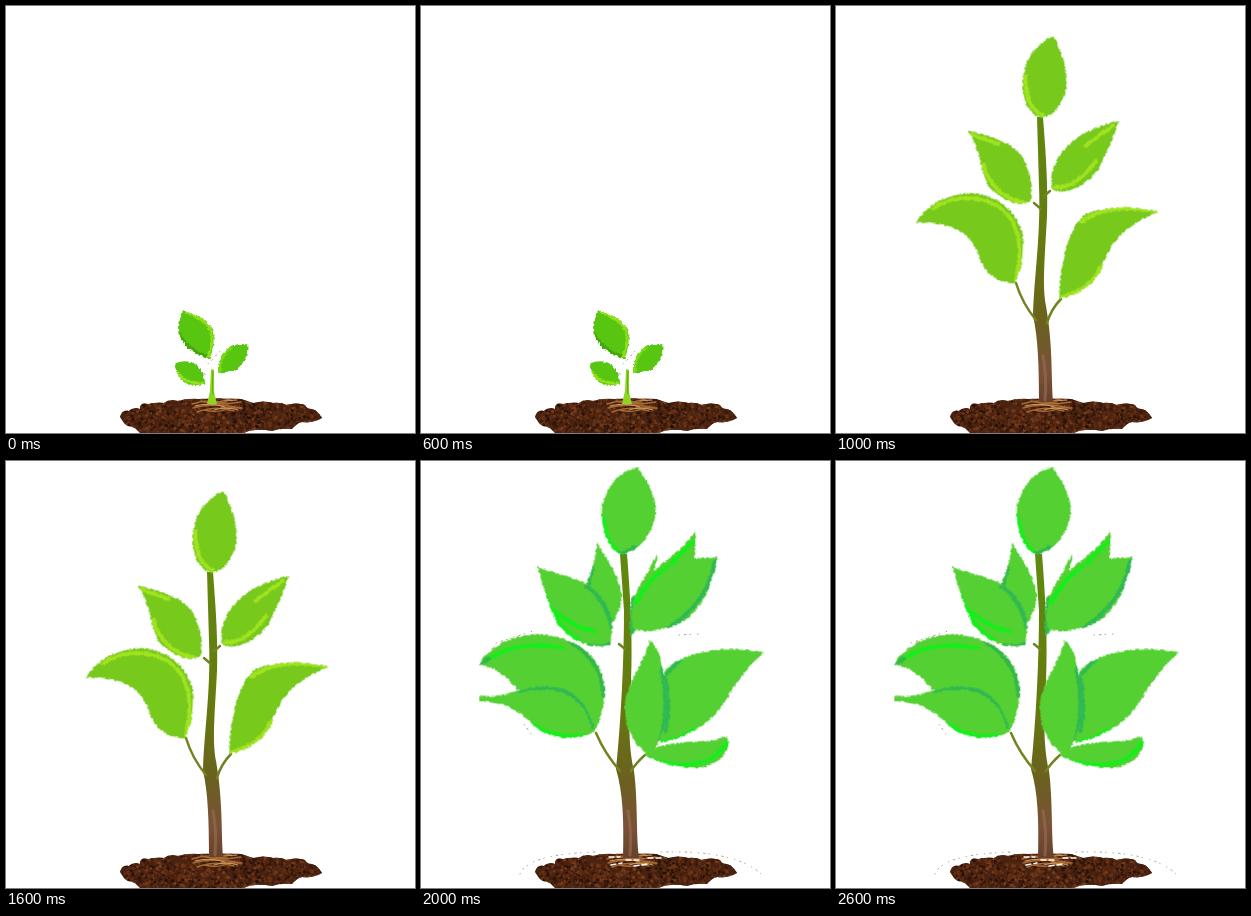
Recreate the animation shown at these times as an HTML page. Size 409x427 px, loop 3 s.

```html
<!DOCTYPE html>
<html lang="en">
<head>
<meta charset="utf-8">
<title>Growing plant</title>
<style>
  html, body { margin: 0; width: 100%; height: 100%; overflow: hidden; background: #fff; }
  svg { display: block; width: 100%; height: 100%; }
  .stage { visibility: hidden; }
  path { stroke-linecap: round; stroke-linejoin: round; }
</style>
</head>
<body>
<svg id="scene" viewBox="0 0 409 427">
  <defs>
    <filter id="rough" x="0" y="0" width="409" height="430" filterUnits="userSpaceOnUse" color-interpolation-filters="sRGB">
      <feTurbulence baseFrequency=".2" numOctaves="2" seed="4"/>
      <feDisplacementMap in="SourceGraphic" scale="1.8" xChannelSelector="R" yChannelSelector="G"/>
    </filter>
    <linearGradient id="bark" gradientUnits="userSpaceOnUse" x1="0" y1="95" x2="0" y2="397">
      <stop offset="0" stop-color="#5f8a0c"/>
      <stop offset=".5" stop-color="#66790f"/>
      <stop offset=".74" stop-color="#6b601f"/>
      <stop offset=".9" stop-color="#7a5138"/>
      <stop offset="1" stop-color="#65412a"/>
    </linearGradient>
    <clipPath id="soilShape">
      <path d="M114 411Q116 403 123 405Q128 400 134 403Q134 396 142 398Q151 396 158 397Q164 392 172 395Q182 392 192 393Q215 392 235 393Q241 395 247 397Q257 394 267 397Q275 396 280 399Q291 396 299 399Q301 403 306 403Q312 405 316 412Q309 417 296 416Q291 417 286 423Q274 422 266 425Q257 423 249 424Q243 424 238 427H134Q130 421 122 420Q118 418 114 411Z"/>
    </clipPath>
  </defs>
  <rect width="409" height="427" fill="#fff"/>
  <g id="soil" clip-path="url(#soilShape)"><rect x="110" y="388" width="210" height="40" fill="#4a2210"/></g>
  <path d="M186 398Q203 392 223 398M187 402Q207 396 233 402M191 406Q210 399 228 405M195 395Q214 400 235 396M198 404Q214 408 229 400M200 400Q215 395 225 393M215 402H236" fill="none" stroke="#a66a35" stroke-width="1.4"/>
  <path d="M189 400Q203 396 219 401M208 404Q219 400 232 404M219 395L231 394" fill="none" stroke="#cf9c64"/>
</svg>
<script>
const scene = document.getElementById('scene');

function add(parent, tag, attrs) {
  const node = document.createElementNS('http://www.w3.org/2000/svg', tag);
  for (const key in attrs) node.setAttribute(key, attrs[key]);
  return parent.appendChild(node);
}

const line = (parent, d, stroke, width, extra) =>
  add(parent, 'path', { d, stroke, fill: 'none', 'stroke-width': width, ...extra });

let seed = 7;
const random = () => (seed = seed * 16807 % 2147483647) / 2147483647;

const soil = document.getElementById('soil');
const earth = ['#220e06', '#35180b', '#4a2210', '#5a2b14', '#6b3518', '#7d421f'];
for (let i = 0; i < 1500; i++) {
  add(soil, 'circle', {
    cx: 113 + random() * 204, cy: 391 + random() * 36, r: .7 + random() * 1.2,
    fill: earth[Math.floor(random() * earth.length)], opacity: .8
  });
}

// Each leaf: outline, then pairs of edge colour and edge path.
const stages = [
  {
    fill: '#58c610',
    leaves: [
      ['M178 305C194 309 206 318 208 328C209 338 207 347 204 353C190 349 174 340 173 325C172 316 175 309 178 305Z',
        '#8fdf16', 'M181 307C197 312 206 321 206 331Q206 342 203 350', '#43a60c', 'M174 328Q180 343 200 350'],
      ['M242 339C243 350 239 358 231 364Q222 367 213 367C211 354 218 344 227 340Q234 338 242 339Z',
        '#7bd818', 'M214 365Q214 349 225 342'],
      ['M169 358C177 355 186 355 192 360Q198 367 199 378Q188 382 178 376Q171 370 169 358Z',
        '#93e01d', 'M172 367Q179 378 197 378']
    ],
    edge: 3,
    stem: 'M205 363L208 364 208 386 211 398H201L204 385Z', stemFill: '#8ed51f',
    twigs: 'M207 365Q206 381 207 388',
    specks: 'M193 365L201 369M202 358L206 354M206 354L215 344'
  },
  {
    fill: '#77c91c',
    leaves: [
      ['M217 30C224 39 231 62 231 78C229 97 219 110 206 112C193 109 186 95 187 77C188 55 198 40 217 30Z',
        '#9fe41e', 'M190 70Q189 103 207 109'],
      ['M132 125C151 130 174 133 187 152C195 165 197 184 195 195C184 202 166 195 153 181C144 166 147 149 132 125Z',
        '#a0e31f', 'M136 129L162 138M148 159C153 182 170 193 189 197'],
      ['M283 115C259 120 238 131 225 148C215 164 214 178 217 184C230 189 250 180 262 165C270 149 277 134 283 115Z',
        '#a0e31f', 'M277 120L250 140M219 181Q238 185 260 155'],
      ['M80 217C94 196 115 186 140 188C165 191 181 206 187 229C189 250 185 265 179 277C163 277 149 269 143 250C137 229 115 215 80 217Z',
        '#a0e31f', 'M97 203C119 187 148 191 163 201C185 218 188 245 180 274'],
      ['M322 206C299 199 270 201 250 208C235 220 226 244 223 293C240 290 255 282 265 265C272 241 285 222 322 206Z',
        '#a0e31f', 'M319 205Q270 198 246 216M226 291Q255 284 265 261']
    ],
    edge: 4,
    stem: 'M201 111H207C210 150 212 180 211 210C209 250 206 279 210 300C217 340 215 370 217 396H203C203 360 202 331 197 310C198 270 205 230 203 180Z',
    twigs: 'M180 277Q186 297 200 314M225 293Q215 303 211 317M198 197L205 203M214 185L208 190'
  },
  {
    fill: '#55d033',
    leaves: [
      ['M217 7C227 20 235 35 235 52C232 75 218 90 200 94C185 85 179 65 181 45C187 25 200 8 217 7Z',
        '#12f01a', 'M182 57Q187 86 199 92', '#32b74b', 'M198 93Q208 91 214 86'],
      ['M177 82C184 96 199 114 201 135C200 150 193 160 190 165L165 125C172 110 174 95 177 82Z',
        '#32b74b', 'M172 108L167 126'],
      ['M116 105C135 115 165 117 180 132C194 148 192 170 190 184C175 189 150 182 138 165C125 140 122 120 116 105Z',
        '#30b855', 'M166 126Q186 140 191 166M168 185Q181 187 189 182',
        '#12f01a', 'M135 150Q149 165 174 171M124 133Q137 168 158 179'],
      ['M236 94Q237 107 223 128Q216 142 215 170L209 175Q209 148 211 138Q220 125 236 94Z',
        '#30b855', 'M211 138V173'],
      ['M274 70Q276 84 273 98L297 96C292 120 285 140 270 155C251 170 226 172 213 169C208 150 213 130 226 118C241 100 262 92 274 70Z',
        '#30b855', 'M295 100C288 127 277 150 246 168', '#12f01a', 'M215 142Q229 117 247 105M251 102L272 81'],
      ['M58 204C71 181 100 172 125 174C155 178 183 195 184 230C183 250 178 265 174 270L140 230 97 229C85 215 75 206 58 204Z',
        '#12f01a', 'M68 198Q96 179 142 187', '#32b74b', 'M60 203L68 198M149 181Q181 199 183 235'],
      ['M58 235C80 238 90 231 110 227C141 222 165 230 174 270C160 279 138 280 120 270C100 255 96 242 58 240Z',
        '#30b855', 'M98 230C139 220 164 233 173 267', '#12f01a', 'M112 264Q137 279 165 275'],
      ['M343 192C310 184 270 188 245 208C238 230 239 260 240 282C266 276 290 264 305 240C315 220 329 205 343 192Z',
        '#30b855', 'M264 194L246 213M244 216Q250 243 245 270', '#12f01a', 'M243 281Q264 277 274 268'],
      ['M229 179C240 190 244 210 246 240C246 265 240 285 228 294C213 285 203 265 204 245C207 220 222 205 229 179Z',
        '#30b855', 'M241 208Q249 249 240 279'],
      ['M223 294C240 281 265 282 290 280L307 276C310 290 300 303 280 307C260 308 240 303 223 294Z',
        '#12f01a', 'M233 300Q287 314 306 282']
    ],
    edge: 4,
    stem: 'M199 93H206C209 130 212 180 210 220C207 260 208 290 213 310C217 340 215 375 218 397H202C203 360 202 331 195 308C200 260 203 200 203 150Z',
    twigs: 'M175 272Q184 293 199 310M224 294Q215 302 210 310M198 183L204 188',
    specks: 'M99 413Q107 393 175 391M240 391Q315 389 340 413M258 174L278 173M110 273L103 263M320 215L307 237M75 182L112 170',
    gaps: 'M188 396H199M205 399H220M190 404L201 402M213 405L228 403M227 397H240'
  }
];

const groups = stages.map((stage, i) => {
  const group = add(scene, 'g', { class: 'stage' });
  add(group, 'path', { d: stage.stem, fill: stage.stemFill || 'url(#bark)' });
  line(group, stage.twigs, i ? '#708521' : '#55ac12', i ? 2.5 : 1);
  if (i) line(group, 'M207 350Q211 372 209 394', '#9a6e56', 3, { opacity: .6 });

  // The shift cancels the mean offset of the displacement noise.
  const plant = add(group, 'g', { filter: 'url(#rough)', transform: 'translate(-.7 -.7)' });
  stage.leaves.forEach(([outline, ...edges], j) => {
    const id = `leaf${i}-${j}`;
    add(add(plant, 'clipPath', { id }), 'path', { d: outline });
    add(plant, 'path', { d: outline, fill: stage.fill });
    for (let k = 0; k < edges.length; k += 2) {
      line(plant, edges[k + 1], edges[k], stage.edge, { 'clip-path': `url(#${id})` });
    }
  });
  if (stage.specks) line(group, stage.specks, '#a39a92', 1, { 'stroke-dasharray': '.5 5 1.5 4 .5 7' });
  if (stage.gaps) line(group, stage.gaps, '#fff', 1.4, { 'stroke-dasharray': '5 3' });
  return group;
});

function draw() {
  const current = Math.floor(performance.now() % 3000 / 1000);
  groups.forEach((group, i) => { group.style.visibility = i === current ? 'visible' : 'hidden'; });
  requestAnimationFrame(draw);
}
draw();
</script>
</body>
</html>
```
